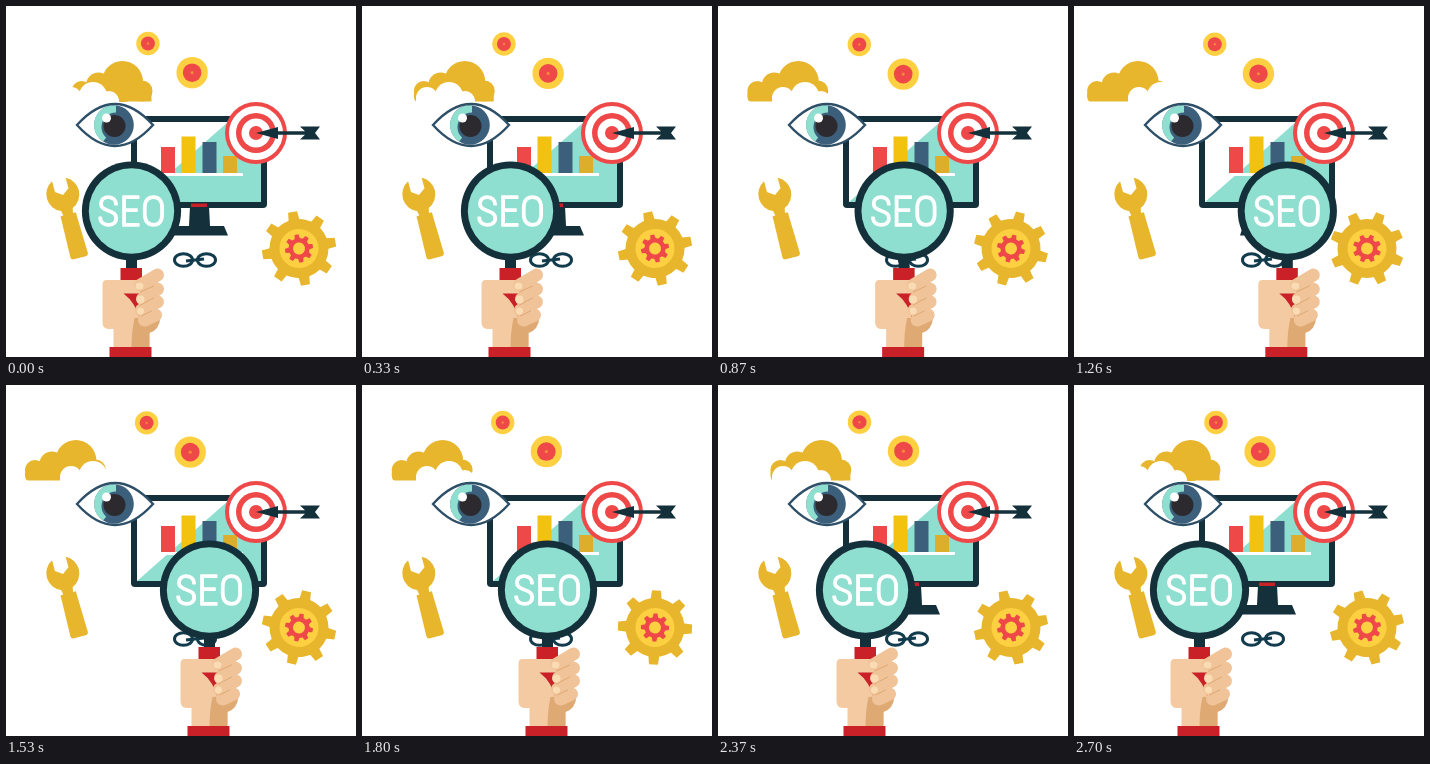
An HTML page for the animation above (2730 ms loop, 350 by 351 pixels).

```html
<!DOCTYPE html>
<html lang="en">
<head>
<meta charset="utf-8">
<title>SEO</title>
<style>
html, body { margin: 0; width: 100%; height: 100%; overflow: hidden; background: #fff; }
svg { display: block; width: 100vw; height: 100vh; }
text {
  font: 300 43px "Roboto Condensed", "Open Sans Condensed", Roboto, sans-serif;
  font-stretch: 75%;
  text-anchor: middle;
  fill: #fff;
  stroke: #fff;
  stroke-width: 1.4px;
  stroke-linejoin: round;
}
.navy { fill: #14303a; }
.gold { fill: #e8b62c; }
.sun { fill: #fdd042; }
.red { fill: #ee4848; }
.cuff { fill: #c92127; }
.teal { fill: #8fdfd1; }
.blue { fill: #3c5f7b; }
.white { fill: #fff; }
.skin { fill: #f3caa2; }
.nail { fill: #fadcb4; }
.shade { fill: #dfa974; }
</style>
</head>
<body>
<svg viewBox="0 0 350 351">
  <g id="small">
    <circle class="sun" r="11.7"/><circle class="red" r="7"/><circle r="1.2" fill="#f58a35"/>
  </g>
  <g id="large">
    <circle class="sun" r="15.7"/><circle class="red" r="9.3"/><circle r="1.6" fill="#f58a35"/>
  </g>

  <g id="cloud" class="gold">
    <circle cx="10" cy="85" r="10"/><circle cx="27" cy="79" r="12.5"/>
    <circle cx="51" cy="75.500" r="20.500"/><circle cx="70.500" cy="85" r="10.500"/>
    <path d="M3 84H80V95.500H3Q0 95.500 0 88Z"/>
  </g>
  <g class="white">
    <circle cx="65" cy="92" r="11"/><circle cx="87" cy="90" r="14"/><circle cx="103" cy="95" r="10"/>
    <rect x="54" y="92" width="59" height="11" rx="3"/>
  </g>

  <g class="gold" transform="translate(57 189) rotate(-15)">
    <path d="M-7-16V-5L0 0L7-5V-16A17 17 0 0 1 6 15L5 20H8V25L9 62Q9 65 6 65H-6Q-9 65-9 62L-8 25V20H-5L-6 15A17 17 0 0 1-7-16Z"/>
  </g>

  <g id="gear">
    <g id="teeth" class="gold"></g>
    <circle class="gold" r="29.5"/><circle class="sun" r="19.5"/>
    <g id="cogs" class="red"></g>
    <circle class="red" r="10.5"/><circle class="sun" r="6"/>
  </g>

  <path class="navy" d="M184 200H203L204 220H218L222 229.500H166L169 220H183Z"/>
  <rect class="navy" x="125" y="110" width="136" height="92" rx="4"/>
  <rect class="white" x="131" y="116" width="124" height="80"/>
  <path class="teal" d="M131 196L222 116H255V196Z"/>
  <rect class="cuff" x="185" y="197.500" width="16" height="3.500"/>
  <rect class="red" x="155" y="141" width="14" height="26"/>
  <rect x="175.500" y="130.500" width="14" height="36.500" fill="#f3c20f"/>
  <rect class="blue" x="196.500" y="136" width="14" height="31"/>
  <rect x="217" y="150" width="14" height="17" fill="#dcae2b"/>
  <rect class="white" x="149" y="167" width="88" height="3"/>

  <g fill="none" stroke="#123c4d" stroke-width="3">
    <ellipse cx="177.500" cy="254" rx="9" ry="6.300"/>
    <ellipse cx="200.500" cy="254" rx="9" ry="6.300"/>
    <path d="M180 255L198 253"/>
  </g>

  <path id="eye" class="white" d="M71 119Q109 77 147 119Q109 161 71 119Z"/>
  <circle class="blue" cx="108" cy="119" r="19.800"/>
  <path class="teal" d="M110 99.300A19.800 19.800 0 0 0 97 135.500L110 120Z"/>
  <circle class="blue" cx="110" cy="121" r="14.500"/>
  <circle cx="108.500" cy="120" r="11" fill="#2c2a2f"/>
  <circle class="white" cx="100.500" cy="112" r="4.500"/>
  <use href="#eye" fill="none" style="fill-opacity:0;stroke:#2d4f68;stroke-width:2.4px"/>

  <g transform="translate(250 127)">
    <circle class="red" r="31"/><circle class="white" r="27"/>
    <circle class="red" r="20"/><circle class="white" r="14.500"/>
    <circle class="red" r="7"/>
    <path class="navy" d="M0 0L22-6V-1.700H49L44-6.500H64L59 0L64 6.500H44L49 1.700H22V6Z"/>
  </g>

  <g id="lens">
    <rect class="navy" x="-5.500" y="46" width="11" height="14"/>
    <rect class="cuff" x="-11" y="57" width="21.500" height="20"/>
    <circle class="navy" r="49.600"/>
    <circle class="teal" r="42.700"/>
    <text y="15.300">SEO</text>
    <path class="skin" d="M-25 69H22V112H18V137H-18V118H-23Q-29 118-29 111V74Q-29 69-25 69Z"/>
    <path class="cuff" d="M-8 82.500H9V111Q5 92-8 82.500Z"/>
    <path class="shade" d="M3 107L29 106Q28 119 18 122V137H0Q0 121 3 107Z"/>
    <g stroke="#f0c398" stroke-width="13" stroke-linecap="round">
      <path d="M9 74L26 64M11 88L26 78M10 99L26 91M13 109L24 104"/>
    </g>
    <g fill="none" stroke="#dfa974" stroke-width="1" stroke-linecap="round">
      <path d="M9 81L22 75M9 94L22 87M10 105L20 100"/>
    </g>
    <g class="nail">
      <ellipse cx="8" cy="75" rx="4" ry="3.500"/><ellipse cx="9" cy="88.500" rx="4" ry="4"/>
      <ellipse cx="9" cy="100" rx="3.500" ry="3.500"/>
    </g>
    <rect class="cuff" x="-22" y="136" width="42" height="10"/>
  </g>
</svg>
<script>
const LOOP = 2730, STEP = 30, TURN = 1320, BACK = 2700;
const $ = id => document.getElementById(id);

function addTeeth(id, count, path) {
  $(id).innerHTML = Array.from({ length: count }, (_, i) =>
    `<path d="${path}" transform="rotate(${i * 360 / count})"/>`).join("");
}
addTeeth("teeth", 8, "M28-5.500L37-4.500V4.500L28 5.500Z");
addTeeth("cogs", 8, "M9-2.800L14-2V2L9 2.800Z");

// Use a smaller size where no condensed face is available.
const label = document.querySelector("text");
const width = label.getComputedTextLength();
if (width > 72) label.style.fontSize = 43 * 72 / width + "px";

const place = (id, x, y, turn = 0) =>
  $(id).setAttribute("transform", `translate(${x} ${y}) rotate(${turn})`);

function draw(t) {
  const slide = t < TURN ? t / TURN : Math.max(0, (BACK - t) / (BACK - TURN));
  const turn = t / LOOP * 360;
  const a = (turn - 25) * Math.PI / 180;
  place("lens", 125.5 + 92 * slide, 205);
  place("cloud", 65.5 - 55 * slide, 0);
  place("gear", 293, 242.5, turn - 10);
  place("small", 141.3 + 0.7 * Math.cos(a), 37.8 + 0.7 * Math.sin(a));
  place("large", 185.2 + Math.cos(a), 67.1 + Math.sin(a));
}

const start = performance.now();
function tick() {
  const t = (performance.now() - start) % LOOP;
  draw(Math.floor(t / STEP) * STEP);
  requestAnimationFrame(tick);
}
tick();
</script>
</body>
</html>
```
